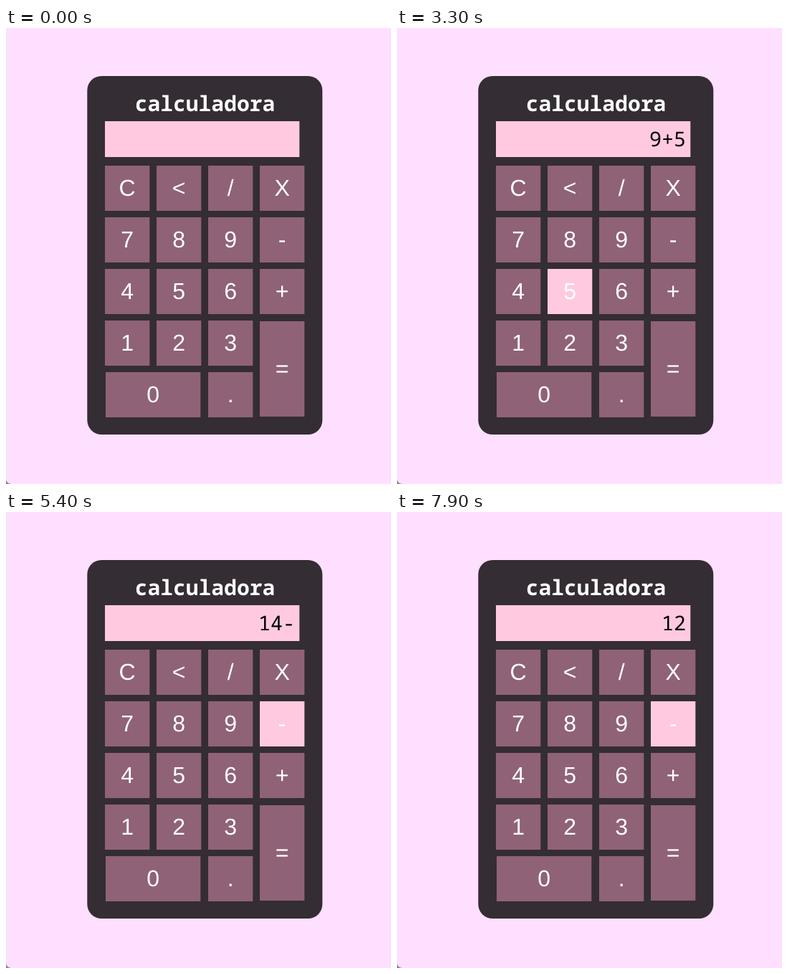
Recreate the animation shown at these times as an HTML page. Size 537 by 636 pixels, loop 8000 ms.

```html
<!DOCTYPE html>
<html lang="es">
<head>
<meta charset="utf-8">
<title>calculadora</title>
<style>
  html, body { margin: 0; width: 100%; height: 100%; overflow: hidden; background: #ffdfff; }
  svg { display: block; width: 537px; height: 636px; }
  text { fill: #fff; text-rendering: geometricPrecision; }
  .mono { font-family: "Noto Sans Mono", "DejaVu Sans Mono", monospace; }
  .title { font-size: 29.6px; font-weight: 700; text-anchor: middle; }
  .value { font-size: 28.3px; text-anchor: end; fill: #000; }
  .key text { font: 32px "Liberation Sans", Arial, sans-serif; text-anchor: middle; }
  .key rect { fill: #8f6277; }
  .key.on rect { fill: #ffcae0; }
</style>
</head>
<body>
<svg id="stage" viewBox="0 0 537 636">
  <rect width="537" height="636" fill="#ffdfff"/>
  <path d="M0 629.5Q.8 635.2 7 636H0Z" fill="#8b808b"/>
  <rect x="113.3" y="67" width="328" height="500" rx="20" fill="#342d33"/>
  <text class="mono title" x="277.5" y="116">calculadora</text>
  <rect x="138" y="130" width="271.3" height="50" fill="#ffcae0"/>
  <text class="mono value" id="value" x="403" y="165"></text>
</svg>
<script>
const LOOP = 8000;
const stage = document.getElementById('stage');
const value = document.getElementById('value');
const keys = {};

function add(parent, tag, attrs) {
  const el = document.createElementNS('http://www.w3.org/2000/svg', tag);
  for (const name in attrs) el.setAttribute(name, attrs[name]);
  return parent.appendChild(el);
}

function addKey(label, x, y, width = 62.3, height = 63) {
  const g = add(stage, 'g', { class: 'key' });
  add(g, 'rect', { x, y, width, height });
  add(g, 'text', { x: x + width / 2, y: y + height / 2 + 10.8 }).textContent = label;
  keys[label] = g;
}

['C</X', '789-', '456+', '123'].forEach((row, r) =>
  [...row].forEach((label, c) => addKey(label, 138 + c * 72, 192 + r * 72)));
addKey('=', 354, 409, 62.3, 133);
addKey('0', 139, 480, 132.3);
addKey('.', 282, 480);

// [time, key under the pointer]
const hovers = [
  [0, ''], [900, '9'], [1800, ''], [1900, '+'], [2600, '6'], [2700, '5'],
  [3400, ''], [3500, '3'], [3700, ''], [3800, '='], [4800, '+'], [5000, '-'],
  [5700, '6'], [5900, ''], [6000, '3'], [6100, '2'], [6800, '3'], [7000, '='],
  [7800, '+'], [7900, '-']
];

// [time, text on the display]
const values = [
  [0, ''], [1400, '9'], [2300, '9+'], [3300, '9+5'], [4300, '14'],
  [5400, '14-'], [6500, '14-2'], [7500, '12']
];

const at = (steps, t) => steps.filter(s => s[0] <= t).pop()[1];

function draw(t) {
  const hover = at(hovers, t);
  for (const label in keys) keys[label].classList.toggle('on', label === hover);
  value.textContent = at(values, t);
}

const start = performance.now();
function tick() {
  draw((performance.now() - start) % LOOP);
  requestAnimationFrame(tick);
}
tick();
</script>
</body>
</html>
```
